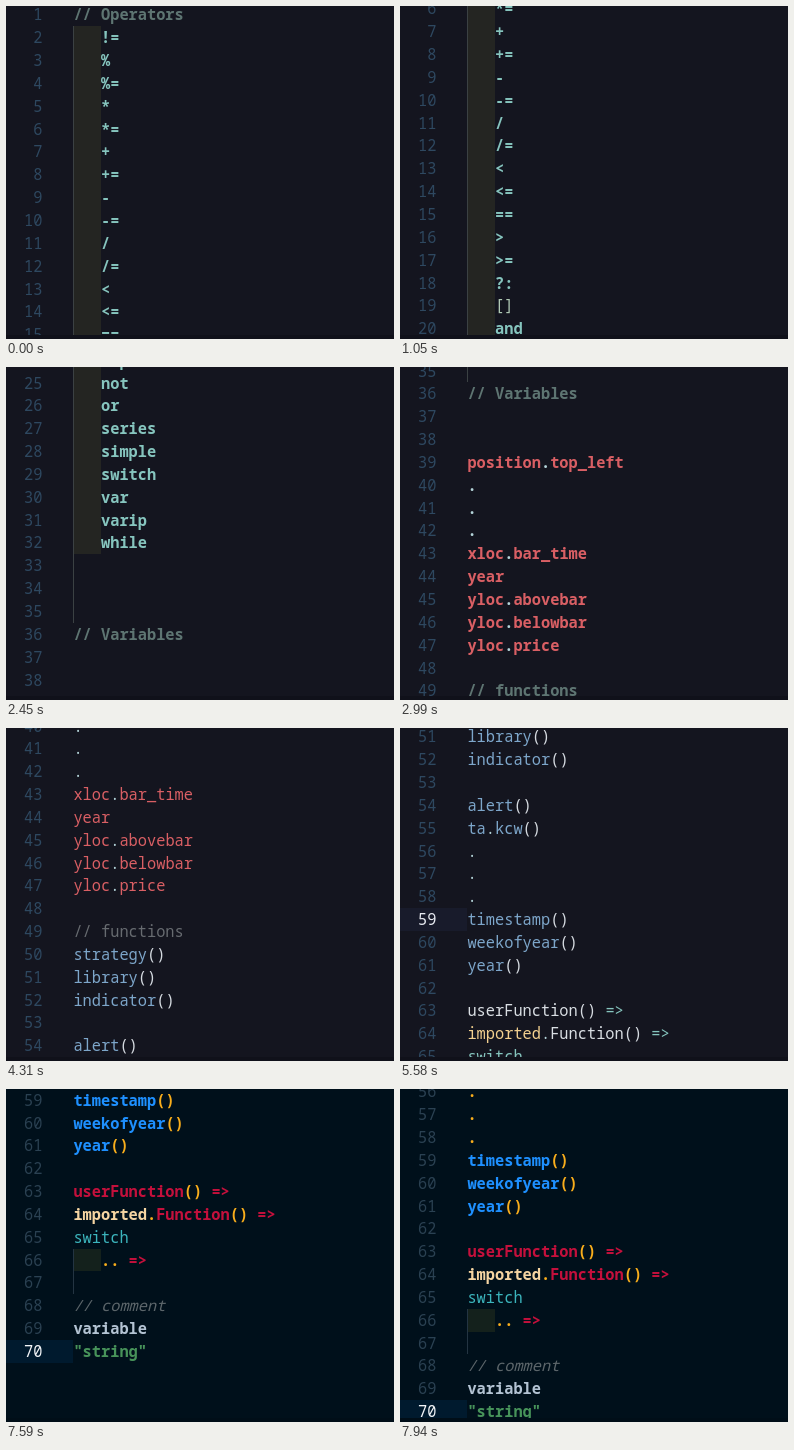
Animation, 388 px wide and 333 px high, one loop 8 s. Source, as an HTML page:

```html
<!DOCTYPE html>
<html lang="en">
<head>
<meta charset="utf-8">
<title>Editor theme preview</title>
<style>
html, body { margin: 0; width: 100%; height: 100%; overflow: hidden; }
#stage {
  position: relative; width: 388px; height: 333px; overflow: hidden;
  background: var(--bg);
  font: 15.33px/22.85px "Noto Sans Mono", "DejaVu Sans Mono", monospace;
  animation: theme 8s step-end infinite;
}
#stage::after {
  content: ""; position: absolute; left: 0; right: 0; bottom: 0; height: 4px;
  background: var(--edge);
}
#code { position: absolute; left: 0; top: 0; width: 100%; margin-top: -2.6px; animation: scroll 8s step-end infinite; }

.line { position: relative; height: 22.85px; white-space: pre; --ln: var(--num); --hl: transparent; }
.first { --ln: var(--num1); --hl: var(--hl1); }
.second { --ln: var(--num2); --hl: var(--hl2); }
.num {
  position: absolute; left: 0; top: 0; width: 36.4px; height: 100%; padding-right: 30.6px;
  text-align: right; color: var(--ln); background: var(--hl);
}
.text { position: absolute; left: 67.4px; top: 0; font-weight: var(--w); }
.guide { position: absolute; left: 67px; top: 0; width: 28px; height: 100%; box-sizing: border-box; border-left: 1px solid var(--guide); }
.guide.fill { background: var(--indent); }

.comment { color: var(--comment); font-weight: var(--wk); font-style: var(--slant); }
.key { color: var(--key); font-weight: var(--wk); }
.arrow { color: var(--arrow); }
.bracket { color: #b0c9b4; font-weight: 400; }
.builtin { color: #d95f64; }
.func { color: var(--func); }
.user { color: var(--user); }
.module { color: var(--module); }
.name { color: var(--name); }
.string { color: var(--string); }
.paren { color: var(--paren); }
.dot { color: var(--dot); }

@keyframes theme {
  0% {
    --bg: #14151f; --edge: #10111a; --num: #2e4860; --num1: #e6e9f0; --num2: #2e4860;
    --hl1: #181b2b; --hl2: transparent; --guide: #3b4143; --indent: #242522;
    --w: 700; --wk: 700; --slant: normal;
    --comment: #5e7572; --key: #86c5be; --arrow: #86c5be; --func: #7da6ca; --user: #d9dee3;
    --module: #f3d08f; --name: #cfdbdd; --string: #cfcc6b; --paren: #d5dae0; --dot: #b5d5da;
  }
  49% { --w: 400; --wk: 400; --comment: #676b70; }
  94.875% {
    --bg: #00101b; --edge: #000e18; --num: #2a4152; --num1: #2a4152; --num2: #f2f5f8;
    --hl1: transparent; --hl2: #001a2e; --guide: #233442; --indent: #14211c;
    --w: 700; --wk: 400; --slant: italic;
    --comment: #5c666b; --key: #3bb5bd; --arrow: #c4103c; --func: #1e90ff; --user: #c4103c;
    --module: #f5d5a2; --name: #b3c3d3; --string: #47935a; --paren: #f9ae1c; --dot: #f9ae1c;
  }
}
/* one wheel notch moves the page 60.12px */
@keyframes scroll {
  0% { top: 0; }
  10.625% { top: calc(-60.12px * 1); }
  13.125% { top: calc(-60.12px * 2); }
  14.875% { top: calc(-60.12px * 3); }
  16.125% { top: calc(-60.12px * 4); }
  17.25% { top: calc(-60.12px * 5); }
  19% { top: calc(-60.12px * 6); }
  26.375% { top: calc(-60.12px * 7); }
  28.875% { top: calc(-60.12px * 8); }
  30.625% { top: calc(-60.12px * 9); }
  33% { top: calc(-60.12px * 10); }
  34.375% { top: calc(-60.12px * 11); }
  35.625% { top: calc(-60.12px * 12); }
  37.375% { top: calc(-60.12px * 13); }
  53.125% { top: calc(-60.12px * 14); }
  53.875% { top: calc(-60.12px * 15); }
  58.125% { top: calc(-60.12px * 16); }
  64.75% { top: calc(-60.12px * 17); }
  66.5% { top: calc(-60.12px * 18); }
  69.75% { top: calc(-60.12px * 19); }
  72.125% { top: calc(-60.12px * 20); }
  79.625% { top: calc(-60.12px * 21); }
  83.25% { top: calc(-60.12px * 22); }
  99.25% { top: calc(-60.12px * 21); }
}
</style>
</head>
<body>
<div id="stage"><div id="code"></div></div>
<script>
const operators = '!= % %= * *= + += - -= / /= < <= == > >= ?: [] and export for if import not or series simple switch var varip while'
  .split(' ').map(op => '   ' + op);
const lines = [
  '// Operators', ...operators, '', '', '',
  '// Variables', '', '', 'position.top_left', '.', '.', '.',
  'xloc.bar_time', 'year', 'yloc.abovebar', 'yloc.belowbar', 'yloc.price', '',
  '// functions', 'strategy()', 'library()', 'indicator()', '',
  'alert()', 'ta.kcw()', '.', '.', '.', 'timestamp()', 'weekofyear()', 'year()', '',
  'userFunction() =>', 'imported.Function() =>', 'switch', '   .. =>', '',
  '// comment', 'variable', '"string"'
];
const words = { userFunction: 'user', Function: 'user', imported: 'module', switch: 'key', variable: 'name' };
const marks = { '=>': 'arrow', '[]': 'bracket', '.': 'dot', '(': 'paren', ')': 'paren' };
const emptyGuides = [33, 34, 35, 67];
const activeClass = { 59: ' first', 70: ' second' };

function kind(token, n) {
  if (token.startsWith('//')) return 'comment';
  if (token[0] === '"') return 'string';
  if (marks[token]) return marks[token];
  if (n < 36) return 'key';
  if (n < 48) return 'builtin';
  return n < 62 ? 'func' : words[token];
}

function add(parent, cls, text = '') {
  const el = document.createElement('span');
  el.className = cls;
  el.textContent = text;
  return parent.appendChild(el);
}

const code = document.getElementById('code');
lines.forEach((source, i) => {
  const n = i + 1;
  const row = document.createElement('div');
  row.className = 'line' + (activeClass[n] || '');
  add(row, 'num', n);
  if (source[0] === ' ') add(row, 'guide fill');
  else if (emptyGuides.includes(n)) add(row, 'guide');
  const text = add(row, 'text');
  for (const token of source.match(/\/\/ .*|".*"|\s+|\w+|=>|[().]|[^\s\w().]+/g) || []) {
    add(text, token.trim() ? kind(token, n) : '', token);
  }
  code.append(row);
});
</script>
</body>
</html>
```
